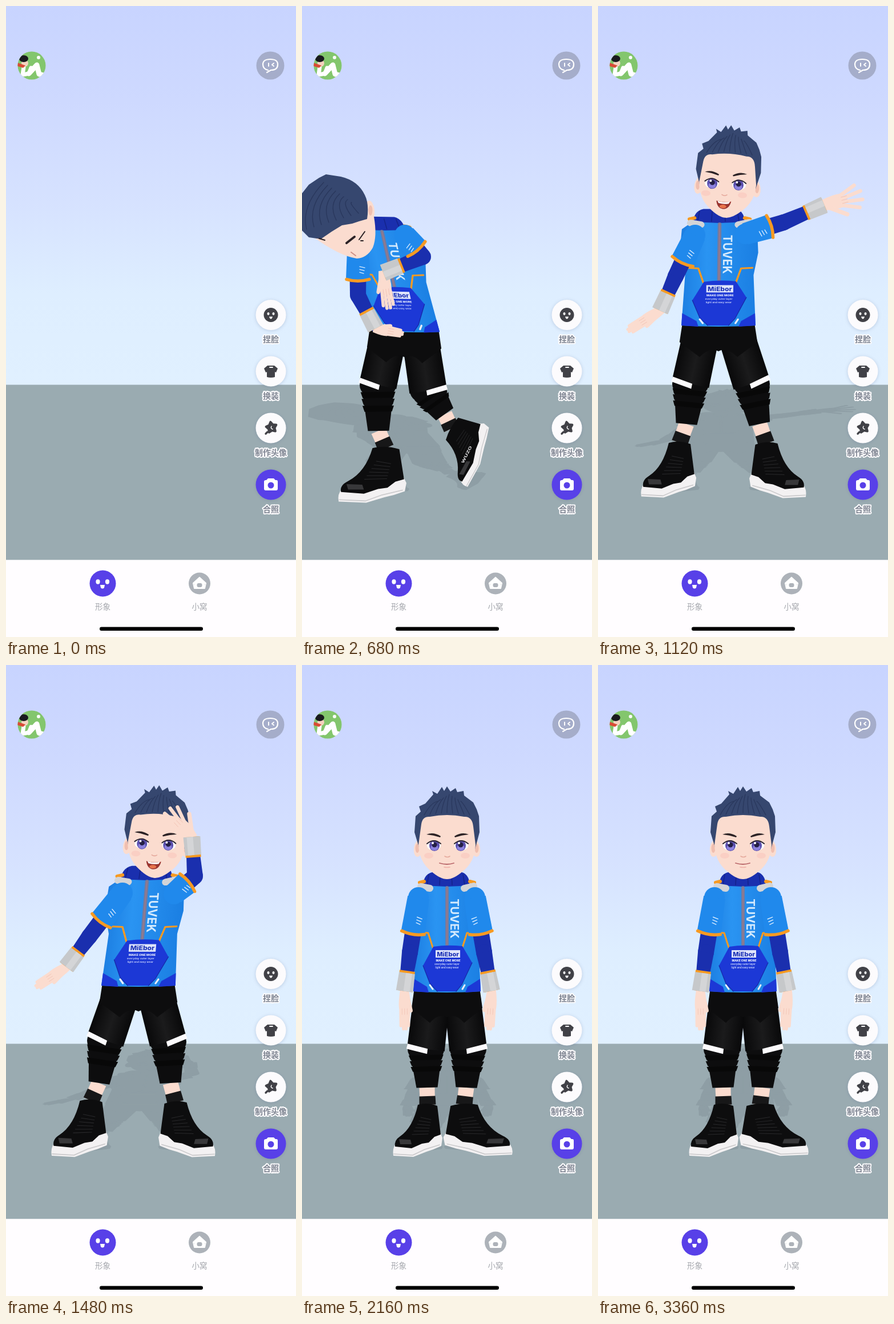
Animation, 508 px wide and 1102 px high, one loop 3.4 s. Source, as an HTML page with a canvas:

```html
<!DOCTYPE html>
<html lang="zh">
<head>
<meta charset="utf-8">
<style>
html, body { margin: 0; height: 100%; overflow: hidden; }
canvas { display: block; width: 100vw; height: 100vh; }
</style>
</head>
<body>
<canvas id="stage"></canvas>
<script>
const W = 508, H = 1102, LOOP = 3400, STEP = 40, TAU = Math.PI * 2;
const cv = document.getElementById('stage'), g = cv.getContext('2d');
const dpr = window.devicePixelRatio || 1;
cv.width = W * dpr;
cv.height = H * dpr;

const SKIN = '#fbdccf', SKIN2 = '#f0bfb0', HAIR = '#36476f', HAIR2 = '#29375c';
const BLUE = '#2089ec', NAVY = '#1a2fae', POUCH = '#1c38d6', ORANGE = '#f79a22';
const GREY = '#c6c8ca', BLACK = '#0d0d0e', WHITE = '#fcfbfd', PURPLE = '#5840e8';
const CJK = '"Noto Sans CJK SC", "Noto Sans CJK", sans-serif';
let shade = null; // when set, everything is drawn in this one colour

// ---- drawing helpers ----
function fill(c, d) { g.fillStyle = shade || c; g.fill(new Path2D(d)); }
function line(c, w, d) {
  g.strokeStyle = shade || c; g.lineWidth = w;
  g.lineCap = g.lineJoin = 'round';
  g.stroke(new Path2D(d));
}
function oval(c, x, y, rx, ry = rx, rot = 0) {
  g.fillStyle = shade || c;
  g.beginPath(); g.ellipse(x, y, rx, ry, rot, 0, TAU); g.fill();
}
function box(c, x, y, w, h, r = 0) {
  g.fillStyle = shade || c;
  g.beginPath(); g.roundRect(x, y, w, h, r); g.fill();
}
function text(s, x, y, font, c, outline) {
  if (shade) return;
  g.font = font; g.textAlign = 'center';
  if (outline) { g.lineJoin = 'round'; g.lineWidth = outline; g.strokeStyle = WHITE; g.strokeText(s, x, y); }
  g.fillStyle = c; g.fillText(s, x, y);
}
function ramp(x0, y0, x1, y1, ...stops) {
  const r = g.createLinearGradient(x0, y0, x1, y1);
  stops.forEach(s => r.addColorStop(...s));
  return r;
}
function group(fn) { g.save(); fn(); g.restore(); }
function spot(x, y, rot, fn) { group(() => { g.translate(x, y); g.rotate(rot); fn(); }); }
function along(a, b, fn) {
  const dx = b[0] - a[0], dy = b[1] - a[1];
  spot(a[0], a[1], Math.atan2(dy, dx), () => fn(Math.hypot(dx, dy)));
}
function taper(a, b, wa, wb, c) {
  along(a, b, l => fill(c, `M0 ${-wa / 2}L${l} ${-wb / 2}L${l} ${wb / 2}L0 ${wa / 2}Z`));
}
const lerp = (a, b, u) => Array.isArray(a) ? a.map((v, i) => lerp(v, b[i], u)) : a + (b - a) * u;

// ---- poses: arm = shoulder, elbow, wrist, fingertip, spread; leg = knee, ankle, foot, [turn, sx, sy] ----
const idle = {
  off: [0, 0], neck: [254, 388], hip: [254, 569], tilt: 0, wide: 1,
  head: [254, 300, 0], yaw: 0, mouth: 0,
  armL: [[204, 406], [189, 502], [184, 538], [180, 636], .12],
  armR: [[303, 406], [319, 502], [326, 538], [328, 636], .12],
  legL: [[217, 671], [219, 738], [220, 768], [0, 1, 1]],
  legR: [[291, 671], [288, 738], [284, 768], [0, -1.4, .98]]
};
const greet = {
  ...idle, neck: [213, 380], hip: [211, 557], wide: 1.1,
  head: [228, 296, .06], yaw: -5, mouth: 1,
  armL: [[170, 400], [136, 472], [122, 503], [53, 567], .1],
  armR: [[258, 398], [325, 378], [367, 360], [463, 330], 1],
  legL: [[162, 660], [155, 730], [143, 763], [0, 1.12, 1.05]],
  legR: [[269, 660], [283, 730], [295, 764], [0, -1.15, 1.05]]
};
const salute = {
  ...greet, neck: [247, 377], hip: [232, 559],
  head: [264, 298, .05], yaw: -3,
  armL: [[204, 398], [146, 474], [125, 502], [53, 562], .1],
  armR: [[294, 400], [331, 369], [328, 332], [282, 254], .9],
  legL: [[174, 656], [163, 730], [149, 761], [0, 1.15, 1.08]],
  legR: [[284, 658], [288, 730], [297, 764], [0, -1.15, 1.05]]
};
const bow = {
  ...idle, neck: [140, 393], hip: [179, 567], tilt: .02, wide: 1.05, head: [60, 360, 0],
  armL: [[98, 428], [98, 505], [114, 535], [176, 572], 0],
  armR: [[180, 400], [212, 438], [172, 454], [152, 528], .3],
  legL: [[133, 662], [134, 742], [147, 772], [0, 1.38, 1.05]],
  legR: [[221, 672], [250, 713], [262, 738], [-1.1, 1.3, .8]]
};
const leap = {
  ...idle, neck: [250, 495], hip: [285, 680], wide: .3, head: [190, 440, 0],
  armL: [[236, 526], [104, 474], [35, 431], [-52, 388], .1],
  armR: [[190, 462], [112, 434], [70, 413], [-10, 393], .1],
  legL: [[330, 766], [272, 751], [250, 755], [1.57, -1.75, 1]],
  legR: [[334, 774], [290, 783], [250, 786], [0, -1.3, .66]]
};
const keys = [
  [60, { ...leap, off: [-430, -40] }], [320, leap], [680, bow], [1120, greet],
  [1480, salute], [1640, salute], [2080, idle], [LOOP, idle]
];
function poseAt(t) {
  const i = keys.findIndex(k => t < k[0]);
  if (i < 1) return null;
  const [t0, a] = keys[i - 1], [t1, b] = keys[i], v = (t - t0) / (t1 - t0), u = v * v * (3 - 2 * v);
  return Object.fromEntries(Object.keys(a).map(k => [k, lerp(a[k], b[k], u)]));
}

// ---- body parts ----
function shoe(x, y, [rot, sx, sy]) {
  spot(x, y, rot, () => {
    g.scale(sx, sy);
    fill('#f3f1f2', 'M20 42L26 58L24 72L10 78L-2 82L-25 91L-60 89Q-62 77 -56 68L-30 72L0 62Z');
    line('#c9c8ca', 1.5, 'M-59 86L-26 88L-5 78L21 70');
    fill(BLACK, 'M-17 0Q0 -5 17 2L23 52L12 56L2 66L-10 68L-28 76L-57 73Q-59 62 -48 55Q-26 40 -17 0Z');
    for (let i = 0; i < 6; i++) line('#29292b', 1, `M${-12 - i * 3} ${22 + i * 6}L${6 - i} ${26 + i * 5}`);
    fill('#38383a', 'M-50 60L-30 61L-28 69L-48 69Z');
    if (Math.abs(rot) > .5) {
      g.translate(-22, 58);
      g.scale(Math.sign(sx), 1);
      text('WUZO', 0, 0, '700 8px Inter, sans-serif', '#e8e8ea');
    }
  });
}
function leg(p, key, side) {
  const [knee, ankle, foot, turn] = p[key], d = side * 27 * p.wide;
  const hip = [p.hip[0] + d, p.hip[1] + 14 + d * p.tilt];
  taper(ankle, foot, 27, 26, SKIN);
  taper(lerp(ankle, foot, .5), foot, 28, 29, '#171718');
  shoe(foot[0], foot[1], turn);
  oval(BLACK, ...hip, 31);
  oval(BLACK, ...knee, 32, 24);
  taper(knee, ankle, 58, 37, BLACK);
  for (let i = 1; i < 4; i++) {
    const m = lerp(knee, ankle, i * .15);
    taper(m, lerp(knee, ankle, i * .15 + .13), 64 - i * 3, 57 - i * 3, i % 2 ? '#080808' : BLACK);
  }
  along(hip, knee, l => {
    const sheen = ramp(0, -32, 0, 32, [0, '#09090a'], [.5, '#1b1b1c'], [1, '#09090a']);
    fill(sheen, `M0 -32L${l} -33L${l} 33L0 32Z`);
    const o = -side;
    fill(WHITE, `M${l - 6} ${o * 33}L${l - 1} ${-o * 3}L${l + 8} ${-o * 3}L${l + 3} ${o * 34}Z`);
  });
}
function hand(a, b, spread, side) {
  along(a, b, l => {
    const m = l * .46;
    g.scale(1, .78 + .22 * spread);
    fill(SKIN, `M-4 -9Q${m * .6} -14 ${m} -12Q${m + 6} 0 ${m} 12Q${m * .6} 14 -4 9Z`);
    line(SKIN, 7.5, `M6 ${side * 6}L${m * 1.1} ${side * (12 + spread * 14)}`);
    for (let i = 0; i < 4; i++) {
      const y = (i - 1.5) * 5.6, k = (i - 1.5) * spread * .3, r = (l - m) * (i === 0 || i === 3 ? .82 : .97);
      line(SKIN, 6.5, `M${m - 2} ${y}L${m + r * Math.cos(k)} ${y * .8 + r * Math.sin(k)}`);
      if (i) line(SKIN2, .8, `M${m} ${y - 2.8}L${m + 10} ${y - 2.8}`);
    }
  });
}
function arm(p, key, side) {
  const [sh, el, wr, tip, spread] = p[key];
  const n = Math.hypot(wr[0] - el[0], wr[1] - el[1]) || 1, end = lerp(el, wr, 1 + 32 / n);
  hand(end, tip, spread, side);
  taper(sh, el, 30, 28, NAVY);
  oval(NAVY, ...el, 14);
  taper(el, wr, 28, 24, NAVY);
  taper(lerp(el, wr, 1 - 4 / n), end, 27, 27, ORANGE);
  taper(wr, end, 28, 30, GREY);
  along(wr, end, l => fill('#d4d5d7', `M0 -9L${l} -9L${l} 2L0 2Z`));
  oval(BLUE, ...sh, 18);
  along(sh, el, l => {
    const c = l * .64;
    fill(BLUE, `M0 -19L${c} -21Q${c + 3} 0 ${c} 21L0 19Z`);
    line(ORANGE, 5.5, `M${c} -20Q${c + 6} 0 ${c} 20`);
    for (let i = 0; i < 3; i++) line('#d9ecff', 1.4, `M${c * .55 + i * 5} ${side * 3}L${c * .55 + i * 5 + 2} ${side * (12 - i)}`);
  });
}
function waist(p) {
  group(() => {
    g.transform(p.wide, p.wide * p.tilt, 0, 1, ...p.hip);
    fill(BLACK, 'M-57 -6L57 -6L62 30L30 56Q14 38 0 46Q-14 38 -30 56L-62 30Z');
  });
}
function torso(p) {
  const s = (p.hip[1] - p.neck[1]) / 181, k = (p.hip[0] - p.neck[0]) / 181;
  waist(p);
  group(() => {
    g.transform(p.wide, p.wide * p.tilt, k, s, p.hip[0], p.hip[1]);
    g.translate(-254, -569);
    fill(NAVY, 'M212 390Q211 366 228 362L280 362Q295 366 294 392Z');
    for (let i = 0; i < 4; i++) line('#14238a', 1.5, `M${222 + i * 20} 366L${219 + i * 22} 384`);
    const cloth = ramp(190, 0, 318, 0, [0, '#1b7ce0'], [.35, '#2a94f2'], [1, '#1a7ee2']);
    fill(cloth, 'M212 384Q254 390 296 384L314 398L316 440L309 480L313 570Q254 574 195 570L200 480L191 440L194 398Z');
    fill(POUCH, 'M195 570L196 548L219 562L222 572ZM313 570L312 548L290 562L286 572Z');
    line('#737b9f', 6, 'M254 389L254 488');
    line('#a07987', 1.5, 'M254 389L254 488');
    line(ORANGE, 3, 'M202 467L221 468L229 493M307 467L289 468L281 493');
    fill(POUCH, 'M230 492Q254 488 281 491L298 520L280 558L270 570L237 570L224 556L212 525Z');
    line('#1729a8', 1.2, 'M212 525L224 556L237 570M298 520L280 558L270 570');
    line('#e8edf8', 3, 'M224 559L229 566M285 559L281 566');
    box('#dfe5fb', 234, 498, 43, 13);
    text('MiEbor', 255.5, 508.5, '800 11px Inter, sans-serif', '#2338b8');
    text('MAKE ONE MORE', 256, 518, '800 5px Inter, sans-serif', '#eef2ff');
    text('everyday outer layer', 254, 524, '600 4.4px Inter, sans-serif', '#d5ddff');
    text('light and easy wear', 254, 530, '600 4.4px Inter, sans-serif', '#d5ddff');
    spot(260, 443, Math.PI / 2, () => text('TUVEK', 0, 0, '700 20px Inter, sans-serif', '#d4eafd'));
    line(ORANGE, 6, 'M206 380L214 378M294 378L302 380');
    line('#d3d4d7', 12, 'M208 387L224 390M284 390L301 386');
  });
}
function sideTorso(p) {
  group(() => {
    g.translate(p.hip[0] - 285, p.hip[1] - 680);
    fill(BLACK, 'M243 690L328 660L355 715L364 770L300 790L285 745L258 725Z');
    fill('#dcdcda', 'M204 540Q205 575 220 592L238 600L236 560Z');
    fill(SKIN, 'M200 470L245 470L250 500L215 500Z');
    fill(NAVY, 'M224 497L268 484L284 500L262 514Z');
    fill(BLUE, 'M205 498Q240 492 284 500Q300 530 315 580L325 620L330 660L243 700Q228 660 236 600Q234 560 206 540Z');
    fill('#1b78da', 'M236 600Q232 560 222 552L258 570Q246 575 244 600Z');
    line('#737b9f', 4, 'M275 508Q300 555 313 606');
    line(ORANGE, 3, 'M236 600L285 592L298 615');
    fill(POUCH, 'M300 614L325 603L330 662L300 670L288 655Z');
    fill(POUCH, 'M233 665L243 700L262 684Z');
    oval('#e1dcd8', 244, 672, 13, 9, -.4);
    oval('#785a4a', 244, 672, 8, 5, -.4);
    line('#d3d4d7', 12, 'M278 494L284 507');
    spot(312, 624, -.15, () => {
      box('#dfe5fb', -6, -9, 20, 15);
      text('MiEbor', 4, 2, '800 6px Inter, sans-serif', '#2338b8');
      for (let i = 0; i < 4; i++) line('#d5ddff', 1.5, `M-5 ${11 + i * 5}L${10 - i * 2} ${10 + i * 5}`);
    });
    spot(290, 554, 1.22, () => text('TUVEK', 0, 0, '700 19px Inter, sans-serif', '#d4eafd'));
  });
}

// ---- heads ----
function eye(x, y, s) {
  oval('#fff', x, y, 12, 9);
  oval('#5b4fae', x + s, y + .5, 9, 9.5);
  oval('#8c82de', x + s, y + 4, 6.5, 5);
  oval('#241f45', x + s, y - 1, 4.5);
  oval('#fff', x + s - 3, y - 4, 2);
  line('#2b2430', 2, `M${x - 12} ${y - 3}Q${x} ${y - 13} ${x + 12} ${y - 3}`);
}
function frontHead(yaw, mouth) {
  for (const s of [-1, 1]) {
    oval(SKIN, s * 50, 20, 8, 15, s * -.15);
    oval(SKIN2, s * 52, 20, 3.5, 8);
  }
  fill(HAIR, 'M-48 22L-57 -8L-55 -36L-46 -44L-49 -53L-38 -58L-24 -74L-26 -80L-17 -75L-9 -87L-5 -80L0 -88L6 -79L15 -85L18 -78L29 -80L30 -72L46 -60L52 -48L56 -36L57 -8L49 22Z');
  for (let i = -4; i < 5; i++) line(HAIR2, 1.2, `M${i * 10} ${-42 + Math.abs(i)}Q${i * 7} -60 ${i * 5 + 4} ${-74 + Math.abs(i) * 3}`);
  fill(SKIN, 'M-45 -22Q-43 -36 -30 -35Q0 -41 30 -35Q44 -36 46 -18L50 14Q49 43 28 60Q12 74 0 74Q-12 74 -28 60Q-49 43 -50 14Z');
  g.translate(yaw, 0);
  oval('#facfc4', -32, 33, 8, 5);
  oval('#facfc4', 32, 33, 8, 5);
  eye(-23, 15, 1);
  eye(25, 15, -1);
  fill('#2b2225', 'M-36 -4Q-24 -9 -11 -1L-12 1Q-24 -3 -36 -4ZM38 -4Q26 -9 13 -1L14 1Q26 -3 38 -4Z');
  line('#e5a99c', 1.6, 'M-4 34Q1 37 5 34');
  if (mouth > .25) {
    const d = 46 + 13 * mouth;
    fill('#9a3530', `M-13 45Q0 49 13 45Q10 ${d} -1 ${d}Q-11 ${d - 1} -13 45Z`);
    fill('#fff', 'M-11 45.5Q0 49 11 45.5L9 49Q0 51 -9 49Z');
    oval('#e8744c', -1, d - 4.5, 6, 3);
  } else {
    line('#b9676a', 1.8, 'M-13 46Q0 50 12 46');
    line('#eeb0a8', 1.6, 'M-5 53Q0 54 5 53');
  }
}
function bowHead() {
  fill(SKIN, 'M-42 42Q0 15 30 15L48 5L66 8Q72 42 64 62Q54 80 36 81Q4 76 -42 42Z');
  oval(SKIN, 59, -3, 8, 17, -.1);
  oval(SKIN2, 60, -3, 3.5, 9);
  fill(HAIR, 'M-66 -25L-48 -48L-30 -60L-18 -66L8 -62Q38 -55 50 -30Q58 -14 54 12L40 16L28 20L10 23L-8 34L-27 47L-48 44L-68 24Z');
  for (let i = 0; i < 8; i++) line(HAIR2, 1.3, `M${-52 + i * 13} ${30 - i * 4}Q${-62 + i * 12} ${-10 - i} ${-22 + i * 7} ${-52 + i * 5}`);
  line('#2b2225', 4, 'M18 54L32 43');
  line('#2b2225', 2, 'M40 48L50 34M43 50L47 50M-30 46L-20 49');
  line('#cf8f86', 2, 'M26 70L34 76');
}
function sideHead() {
  fill(SKIN, 'M-26 -30L0 -39L30 -29Q42 -24 50 -26Q58 -22 55 -14L68 -4L75 8L71 22Q64 36 46 42L27 52L-5 50L-20 20Z');
  fill(HAIR, 'M-69 32L-68 -16L-58 -36L-46 -42L-48 -54L-34 -59L-12 -60L-4 -56L2 -40L-22 -30L-28 -12L-12 12L2 22L4 30L20 50L12 56L-12 52L-42 36L-60 38Z');
  for (let i = 0; i < 6; i++) line(HAIR2, 1.3, `M${-60 + i * 7} ${28 - i * 3}Q${-62 + i * 7} -8 ${-44 + i * 6} ${-44 + i * 2}`);
  oval(SKIN, -4, 36, 9, 13, -.7);
  oval(SKIN2, -3, 37, 4, 7, -.7);
  line('#2b2225', 4, 'M0 -24Q8 -29 17 -28');
  line('#5b4fae', 4, 'M14 -5L25 -8');
  line('#2b2225', 2, 'M10 -3Q18 -11 28 -9');
  line('#c98277', 1.6, 'M54 -14L50 -10M64 1L54 -3');
}

function figure(p, t) {
  const side = t < 500;
  const head = () => spot(...p.head, () => side ? sideHead() : t < 880 ? bowHead() : frontHead(p.yaw, p.mouth));
  group(() => {
    g.translate(...p.off);
    if (side) arm(p, 'armR', 1);
    leg(p, 'legR', 1);
    leg(p, 'legL', -1);
    if (side) { sideTorso(p); head(); arm(p, 'armL', -1); }
    else { torso(p); arm(p, 'armL', -1); head(); arm(p, 'armR', 1); }
  });
}
function castShadow(p, t) {
  group(() => {
    g.beginPath(); g.rect(0, 661, W, 306); g.clip();
    g.transform(.93, 0, 0, .28, 18, 610);
    shade = '#8e9ea5';
    figure(p, t);
    shade = null;
  });
}

// ---- scenery and controls ----
function backdrop() {
  box(ramp(0, 0, 0, 661, [0, '#c8d4ff'], [.25, '#ced9ff'], [.52, '#d6e2ff'], [.76, '#deeeff'], [1, '#e0f0ff']), 0, 0, W, 662);
  box('#9aabb1', 0, 661.5, W, 306);
}
function button(y, label, c, icon) {
  group(() => {
    g.shadowColor = 'rgba(80,95,140,.25)'; g.shadowBlur = 6; g.shadowOffsetY = 1;
    oval(c, 464, y, 26.5);
  });
  spot(464, y, 0, icon);
  text(label, 464, y + 47.5, '600 14px ' + CJK, '#7f8592', 4);
}
function controls() {
  group(() => {
    g.beginPath(); g.arc(45, 104, 24.5, 0, TAU); g.clip();
    box('#83c66d', 20, 79, 50, 50);
    line('#fff', 7, 'M31 107L29 120L40 118L44 108');
    line('#fff', 9, 'M40 118L54 103L58 119L66 121');
    oval('#f5d2c0', 33, 100, 6);
    oval('#191a1e', 31, 92, 8, 6);
    fill('#d94b35', 'M20 99L34 104L30 108L20 105Z');
    oval('#fff', 57, 90, 3);
  });
  oval('#a5adca', 463, 104, 24.5);
  line('#fff', 2.2, 'M459 112Q450 110 450 102Q450 93 463 93Q476 93 476 102Q476 112 464 112L457 116');
  line('#fff', 2, 'M460 100L460 105M469 100L466 102.5L469 105');

  const dark = '#414147';
  button(539.5, '捏脸', WHITE, () => {
    oval(dark, 0, 0, 12.5);
    oval('#fff', -4.5, -2, 2, 2.4); oval('#fff', 4.5, -2, 2, 2.4);
    fill('#fff', 'M-3 3L3 3Q2 7 0 7Q-2 7 -3 3Z');
  });
  button(638, '换装', WHITE, () => {
    fill(dark, 'M-6 -10L6 -10L12 -5L9 2L7 1L7 10Q0 12 -7 10L-7 1L-9 2L-12 -5Z');
    line('#fff', 1.8, 'M-2 -7L3 -7');
  });
  button(737, '制作头像', WHITE, () => {
    let d = '';
    for (let i = 0; i < 10; i++) {
      const r = i % 2 ? 5.5 : 9.5, a = i * TAU / 10 - 1.75;
      d += (i ? 'L' : 'M') + (1 + r * Math.cos(a)) + ' ' + (-1 + r * Math.sin(a));
    }
    fill(dark, d + 'Z');
    line(dark, 4, d + 'Z');
    line('#fff', 1.5, 'M1 -3Q-1 1 3 2');
    line(dark, 3.4, 'M-6 7L-9 10');
  });
  button(836, '合照', PURPLE, () => {
    fill('#fff', 'M-5 -11L5 -11L8 -8L10 -8Q12 -8 12 -5L12 7Q12 10 9 10L-9 10Q-12 10 -12 7L-12 -5Q-12 -8 -9 -8L-8 -8Z');
    oval(PURPLE, 0, 1, 5.5);
  });

  box('#fffdff', 0, 967.5, W, 135);
  oval(PURPLE, 169.5, 1008.5, 23);
  oval('#fff', 161, 1005.5, 3.6, 4.2); oval('#fff', 177.5, 1005.5, 3.6, 4.2);
  fill('#fff', 'M165 1011L173 1011L172 1016Q169 1019 166 1016Z');
  oval('#adb2b9', 339, 1008.5, 19);
  fill('#fff', 'M339 997L351 1008L348 1010L348 1018L330 1018L330 1010L327 1008Z');
  line('#fff', 2, 'M339 998L350 1008L348 1017L330 1017L328 1008Z');
  box('#adb2b9', 334.5, 1008, 9, 7, 3);
  text('形象', 169.5, 1054, '400 13.5px ' + CJK, '#a5a7ad');
  text('小窝', 339, 1054, '400 13.5px ' + CJK, '#a5a7ad');
  box('#000', 164, 1084.5, 181, 6.5, 3.2);
}

const start = performance.now();
function frame(now) {
  const t = Math.floor(Math.max(0, now - start) % LOOP / STEP) * STEP, p = poseAt(t);
  g.setTransform(dpr, 0, 0, dpr, 0, 0);
  backdrop();
  if (p) { castShadow(p, t); figure(p, t); }
  controls();
  requestAnimationFrame(frame);
}
frame(start);
</script>
</body>
</html>
```
